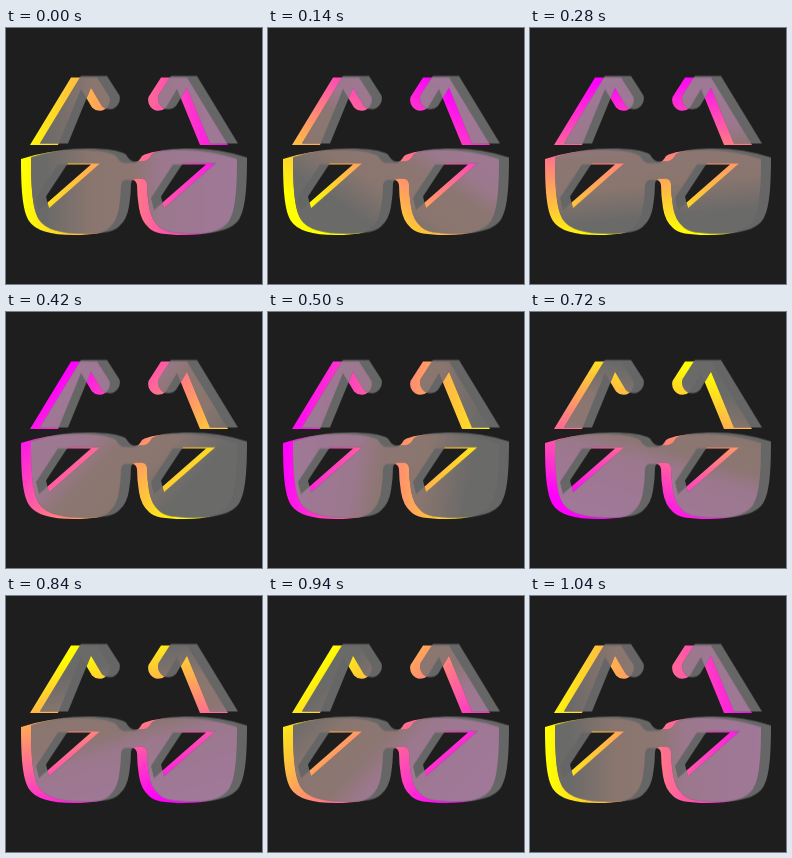
An HTML page that plays this animation: 256 by 256 pixels, repeating every 1.06 s.

```html
<!DOCTYPE html>
<html lang="en">
<head>
<meta charset="utf-8">
<title>Glasses</title>
<style>
  html, body { margin: 0; width: 100%; height: 100%; overflow: hidden; background: #1e1e1e; }
  svg { display: block; width: 100%; height: 100%; }
  #front { fill-rule: evenodd; clip-rule: evenodd; }
  .spin { transform-origin: 0 0; animation: spin 1060ms infinite; }
  /* 52 steps of 20 ms, then the last pose holds for one more step */
  @keyframes spin {
    0% { transform: rotate(0deg); animation-timing-function: steps(52, end); }
    98.1132%, 100% { transform: rotate(-360deg); }
  }
</style>
</head>
<body>
<svg viewBox="0 0 256 256">
  <defs>
    <!-- frame outline, then the two glints cut out of the lenses -->
    <path id="front" d="M15 131Q42 122 72 122C90 122 104 124 110 128Q114 135 118 135H128Q132 135 136 128
      C142 124 156 122 174 122Q204 122 231 131C231 165 229 183 223 193Q214 207 178 207
      C158 207 148 205 143 200Q135 193 133 180Q131 168 131 157Q130 152 126 152H120Q116 152 115 157
      Q115 168 113 180Q111 193 103 200C98 205 88 207 68 207Q32 207 23 193C17 183 15 165 15 131Z
      M52 136.500H85L33 182L30 170Z M167 136.500H200L148 182L145 170Z"/>
    <path id="arm" d="M24 117L65 49.500H91L103.500 69A10.500 10.500 0 0 1 86 79.500L75 61L52 117Z"/>
    <g id="glasses">
      <use href="#front"/>
      <use href="#arm"/>
      <use href="#arm" transform="translate(246 0) scale(-1 1)"/>
    </g>
    <clipPath id="shape">
      <use href="#front"/>
      <use href="#arm"/>
      <use href="#arm" transform="translate(246 0) scale(-1 1)"/>
    </clipPath>
    <linearGradient id="glow" gradientUnits="userSpaceOnUse" x1="-1" y1="0" x2="1" y2="0">
      <stop offset="0" stop-color="#ff0"/>
      <stop offset="1" stop-color="#f0f"/>
    </linearGradient>
    <linearGradient id="muted" gradientUnits="userSpaceOnUse" x1="-1" y1="0" x2="1" y2="0">
      <stop offset=".1" stop-color="#6a6a69"/>
      <stop offset=".32" stop-color="#8a766f"/>
      <stop offset=".52" stop-color="#8c7672"/>
      <stop offset=".65" stop-color="#9c788e"/>
      <stop offset="1" stop-color="#a07898"/>
    </linearGradient>
  </defs>
  <g clip-path="url(#shape)">
    <g transform="translate(123 128) scale(106 78)">
      <rect class="spin" x="-3" y="-3" width="6" height="6" fill="url(#glow)"/>
    </g>
  </g>
  <!-- grey copy, shifted; the glow shows muted where both copies overlap -->
  <g transform="translate(10 -1.500)">
    <use href="#glasses" fill="#666"/>
    <g clip-path="url(#shape)">
      <g transform="translate(-10 1.500)" clip-path="url(#shape)">
        <g transform="translate(123 128) scale(106 78)">
          <rect class="spin" x="-3" y="-3" width="6" height="6" fill="url(#muted)"/>
        </g>
      </g>
    </g>
  </g>
</svg>
</body>
</html>
```
